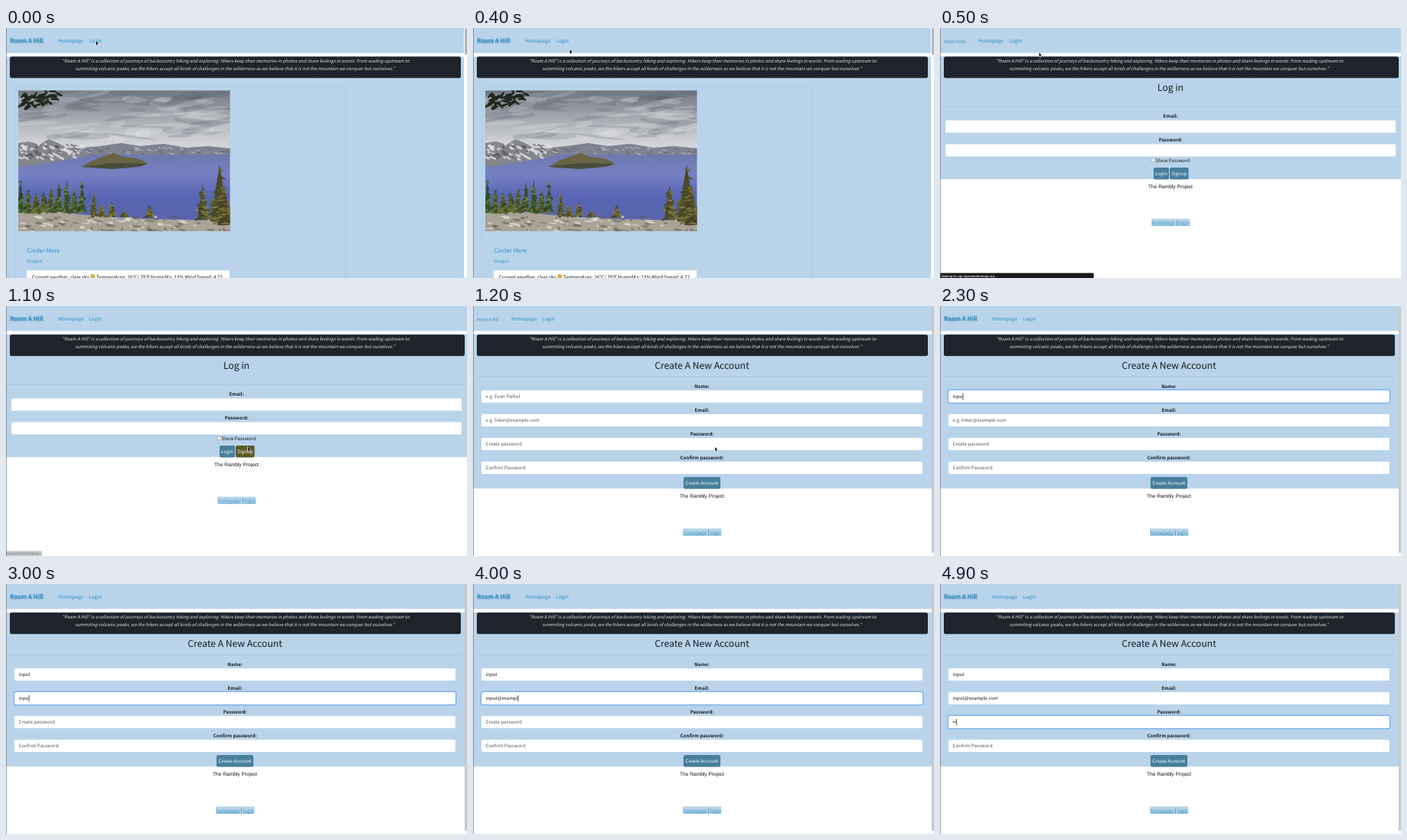
These frames come from a looping animation (600x326 px, 5 s). An HTML page with a canvas:

```html
<!DOCTYPE html>
<html lang="en">
<head>
<meta charset="utf-8">
<title>Hiking site sign-up</title>
<style>
html, body { margin: 0; width: 100%; height: 100%; overflow: hidden; background: #fff; }
canvas { display: block; }
</style>
</head>
<body>
<canvas id="stage" width="600" height="326"></canvas>
<script>
const ctx = document.getElementById('stage').getContext('2d');
const SANS = '"Noto Sans CJK SC", "Noto Sans CJK JP", "Noto Sans CJK", sans-serif';
const UI = 'Inter, sans-serif';
const ARIAL = '"Liberation Sans", sans-serif';
const BLUE = '#b9d4ea', INK = '#14191d', LINK = '#1f8cca', GREY = '#4f575e';
const LOOP = 5000, STEP = 100;
// steps at which pages, focus and mouse states change
const LOGIN_AT = 5, HOVER_AT = 9, SIGNUP_AT = 12, FOCUS_AT = [14, 25, 46];
// step at which each character appears
const NAME_KEYS = [20, 21, 22, 23, 24];
const EMAIL_KEYS = [27, 28, 29, 30, 31, 32, 35, 36, 37, 37, 40, 40, 41, 42, 43, 44, 45];
const PASSWORD_KEYS = [48, 49];
const MOUSE = [[0, 117, 17], [2, 117, 17], [5, 129, 32], [9, 315, 184], [12, 315, 184], [14, 259, 119], [20, 259, 119]];

function rect(x, y, w, h, color, radius = 0) {
  ctx.fillStyle = color;
  ctx.beginPath();
  ctx.roundRect(x, y, w, h, radius);
  ctx.fill();
}

function text(str, x, y, { size = 6.1, color = INK, align = 'left', style = '', family = SANS } = {}) {
  ctx.font = `${style} ${size}px ${family}`;
  ctx.fillStyle = color;
  ctx.textAlign = align;
  ctx.fillText(str, x, y);
  return ctx.measureText(str).width;
}

function poly(color, ...points) {
  ctx.fillStyle = color;
  ctx.beginPath();
  for (let i = 0; i < points.length; i += 2) ctx.lineTo(points[i], points[i + 1]);
  ctx.fill();
}

function ellipse(x, y, rx, ry, color, angle = 0) {
  ctx.fillStyle = color;
  ctx.beginPath();
  ctx.ellipse(x, y, rx, ry, angle, 0, 7);
  ctx.fill();
}

function gradient(y0, y1, ...colors) {
  const g = ctx.createLinearGradient(0, y0, 0, y1);
  colors.forEach((c, i) => g.addColorStop(i / (colors.length - 1), c));
  return g;
}

function seeded(seed) {
  return () => (seed = seed * 16807 % 2147483647) / 2147483647;
}

function tree(rnd, x, top, bottom, half, hue) {
  poly(`hsl(${hue} 30% 22%)`, x, top, x + half * .7, bottom, x - half * .7, bottom);
  for (let i = 0; i < 40; i++) {
    const k = Math.sqrt(rnd()), side = rnd() * 2 - 1;
    ellipse(x + side * half * k, top + (bottom - top) * k, 1 + half * .2, 1.2,
      `hsl(${hue} 34% ${18 + rnd() * 22}%)`, side * .6);
  }
}

function photo() {
  const rnd = seeded(41);
  ctx.save();
  ctx.beginPath();
  ctx.rect(16, 81.5, 275.5, 183.5);
  ctx.clip();
  rect(16, 81, 276, 90, gradient(81, 160, '#70767f', '#969ba3', '#bcbfc4', '#dcddde'));
  for (let i = 0; i < 70; i++) {
    const tone = rnd() < .55 ? '240,240,240' : '82,90,104';
    ellipse(16 + rnd() * 276, 84 + rnd() * 58, 10 + rnd() * 30, 1.5 + rnd() * 4, `rgba(${tone},.2)`, -.3 + rnd() * .45);
  }
  poly('#7f8290', 16, 158, 100, 156, 122, 154, 150, 150, 175, 154, 205, 151, 235, 156, 262, 154, 292, 157, 292, 167, 16, 176);
  rect(16, 165, 276, 90, gradient(165, 245, '#6f79ae', '#7580c2', '#5865b4', '#5865ae'));
  poly('#85868c', 16, 150, 30, 148, 44, 152, 55, 145, 68, 150, 80, 157, 98, 158, 118, 164, 84, 171, 50, 177, 16, 181);
  for (let i = 0; i < 75; i++) {
    const x = 16 + rnd() * 84, y = 151 + rnd() * 20;
    ellipse(x, y, 1 + rnd() * 4, .8 + rnd(), rnd() < .6 ? 'rgba(232,233,238,.75)' : 'rgba(70,70,76,.6)', .5);
  }
  for (let i = 0; i < 50; i++) {
    ellipse(105 + rnd() * 187, 156 + rnd() * 8, 1 + rnd() * 4, .7, rnd() < .4 ? 'rgba(220,222,230,.5)' : 'rgba(82,82,92,.5)', .3);
  }
  poly('#696444', 98, 181, 112, 173, 128, 167, 140, 163, 153, 168, 171, 170, 185, 176, 178, 180, 140, 183);
  poly('#484c3c', 98, 181, 140, 176, 185, 177, 172, 181, 138, 184);
  poly('#aaa397', 16, 233, 55, 238, 95, 243, 140, 247, 190, 249, 235, 250, 292, 252, 292, 266, 16, 266);
  for (let i = 0; i < 110; i++) {
    ellipse(16 + rnd() * 276, 246 + rnd() * 19, 1 + rnd() * 6, .5 + rnd() * 1.4,
      rnd() < .5 ? 'rgba(228,224,220,.7)' : 'rgba(88,84,68,.5)', .12);
  }
  for (let i = 0; i < 9; i++) tree(rnd, 19 + i * 10, 196 + rnd() * 18, 238 + rnd() * 5, 6, 75 + rnd() * 25);
  for (const [x, y] of [[114, 215], [125, 230], [138, 226], [154, 240], [187, 233]]) tree(rnd, x, y, 246, 5, 56);
  tree(rnd, 256, 204, 250, 10, 56);
  tree(rnd, 278, 178, 252, 17, 60);
  tree(rnd, 284, 205, 257, 13, 50);
  for (let i = 0; i < 42; i++) {
    const x = 15 + rnd() * 58;
    ellipse(x, 81 + rnd() * (28 - (x - 16) * .27), 5, 1.5, '#20281f', rnd() * 2 - 1);
  }
  ctx.restore();
}

function header(right, loading) {
  rect(0, 0, right, 32.5, BLUE);
  ctx.save();
  Object.assign(ctx, { shadowColor: 'rgba(20,80,130,.45)', shadowBlur: 1.5, shadowOffsetX: .6, shadowOffsetY: .6 });
  text('Roam A Hill', 5, 19, loading ? { size: 5.2, color: '#58a9d6' } : { size: 7.7, color: '#2f93c8', style: 'bold' });
  ctx.restore();
  const x = loading ? 50 : 68;
  text('Homepage', x, 18.7, { size: 6.45, color: LINK });
  text('Login', x + 40, 18.7, { size: 6.45, color: LINK });
}

function banner(right) {
  rect(5, 37.3, right - 5, 28, '#1e242a', 2.5);
  const style = { size: 5.77, color: '#e2e4e6', align: 'center', style: 'italic' };
  text('"Roam A Hill" is a collection of journeys of backcountry hiking and exploring. Hikers keep their memories in photos and share feelings in words. From wading upstream to', 299, 45, style);
  text('summiting volcanic peaks, we the hikers accept all kinds of challenges in the wilderness as we believe that it is not the mountain we conquer but ourselves."', 298, 55, style);
}

function footer(center, y, linksY) {
  text('The Rambly Project', center, y, { size: 6.6, family: ARIAL, align: 'center', color: '#111' });
  rect(center - 24.7, linksY - 7.3, 50, 9.6, '#b3d3ea');
  let x = center - 24.2;
  for (const word of ['homepage', ' | ', 'login']) {
    const isLink = word !== ' | ';
    const w = text(word, x, linksY, { color: isLink ? '#3a98c6' : INK });
    if (isLink) rect(x, linksY + .8, w, .6, '#3a98c6');
    x += w;
  }
}

function title(str, center) {
  text(str, center, 82, { size: 12.1, style: '500', align: 'center' });
}

function button(label, x, y, w, color = '#477f9d') {
  rect(x, y, w, 15.5, color, 2);
  text(label, x + w / 2, y + 10, { color: '#fff', align: 'center' });
}

function field(label, center, x, y, w, { value = '', hint = '', focus = false, family } = {}) {
  text(label, center, y - 3.2, { size: 6.05, style: 'bold', align: 'center' });
  if (focus) {
    rect(x - 1.5, y - 1.5, w + 3, 19, '#8bb9ee', 3);
    rect(x - .5, y - .5, w + 1, 17, '#6aa5e8', 2);
  }
  rect(x, y, w, 16, '#fff', 2);
  const style = value ? { color: INK, family } : { color: GREY };
  const textWidth = text(value || hint, x + 5.5, y + 10.3, style);
  if (focus) rect(x + 5.8 + (value ? textWidth : 0), y + 4, .7, 8.5, '#111');
}

function homePage() {
  rect(0, 0, 596, 326, BLUE);
  rect(0, 32.5, 596, 5, '#fff');
  header(596);
  banner(592);
  ctx.strokeStyle = '#abc6dc';
  ctx.lineWidth = .7;
  ctx.strokeRect(12, 77, 430, 260);
  photo();
  text('Cinder Mere', 27, 293, { size: 7.7, color: '#2598cf' });
  text('Oregon', 27, 306, { size: 5.9, color: '#2598cf', style: '500' });
  rect(27, 316, 264, 10, '#fff');
  text('Current weather: clear sky', 34, 327, { color: '#111' });
  ellipse(113, 324, 3, 3, '#d9ae4b');
  text('Temperature: 26°C/ 79°F Humidity: 13% Wind Speed: 4.72', 117.5, 327, { size: 6.2, color: '#111' });
  rect(597, 0, 3, 35, '#b5b5b5', 1.5);
}

function loginPage(step) {
  const loading = step === LOGIN_AT, hover = step >= HOVER_AT;
  rect(0, 37, 600, 160, BLUE);
  header(600, loading);
  banner(597);
  title('Log in', 300);
  rect(0, 102.5, 600, .7, '#a6c0d4');
  field('Email:', 300, 7, 120.5, 586);
  field('Password:', 300, 7, 151.5, 586);
  rect(275, 170, 5, 5, '#777', 1);
  rect(275.5, 170.5, 4, 4, '#fff', .5);
  text('Show Password', 280.5, 175.2);
  button('Login', 278, 182, 20);
  button('Signup', 299, 182, 24.5, hover ? '#5d5b24' : undefined);
  footer(300, 208.5, 256);
  if (loading) {
    rect(0, 319.5, 200, 6.5, '#19191b', 1);
    text('Waiting for api.openweathermap.org...', 2, 324.5, { size: 3.9, color: '#e4e4e4', style: '600', family: UI });
  } else if (hover) {
    rect(0, 319.5, 47, 6.5, '#c3c6c9', 1);
    text('localhost:3000/signup', 1.5, 324.3, { size: 3.9, color: '#6d7175', family: UI });
  }
}

function signupPage(step) {
  const typed = (str, keys) => str.slice(0, keys.filter(k => k <= step).length);
  const active = FOCUS_AT.filter(s => s <= step).length - 1;
  const fields = [
    ['Name:', 'e.g. Evan Pathel', typed('input', NAME_KEYS)],
    ['Email:', 'e.g. hiker@example.com', typed('input@example.com', EMAIL_KEYS)],
    ['Password:', 'Create password', typed('••', PASSWORD_KEYS), ARIAL],
    ['Confirm password:', 'Confirm Password', '']
  ];
  rect(0, 37, 597, 201, BLUE);
  header(597, step === SIGNUP_AT);
  banner(592);
  title('Create A New Account', 298);
  rect(5, 92, 587, .7, '#a6c0d4');
  fields.forEach(([label, hint, value, family], i) =>
    field(label, 298, 11, 110 + i * 31, 574, { hint, value, family, focus: i === active }));
  button('Create Account', 274, 223, 48);
  footer(298, 249.5, 297.5);
  rect(597, 0, 3, 322, '#c6c8ca', 1.5);
  if (step > FOCUS_AT[0] && step < NAME_KEYS[0]) {
    rect(11, 126.5, 66, 80, '#1b1c1e', 2);
    ['Tomas Orvel', 'Evan Rudo', 'Tomas', 'tomas', 'Bartholomew', 'evan'].forEach((name, i) =>
      text(name, 15, 137.5 + i * 12.4, { size: 4.4, color: '#f2f2f2', style: '600', family: UI }));
  }
}

function pointer(step) {
  const i = MOUSE.findIndex(p => p[0] > step);
  if (i < 0) return;
  const [s0, x0, y0] = MOUSE[i - 1], [s1, x1, y1] = MOUSE[i];
  const u = (step - s0) / (s1 - s0), k = u * u * (3 - 2 * u);
  const x = x0 + (x1 - x0) * k, y = y0 + (y1 - y0) * k;
  if (step >= FOCUS_AT[0]) {
    rect(x - .4, y - 3, .8, 6, '#222');
    rect(x - 1.3, y - 3.2, 2.6, .6, '#222');
    rect(x - 1.3, y + 2.6, 2.6, .6, '#222');
  } else {
    poly('#fff', x - .7, y - 1, x + 4.2, y + 3.9, x + 2, y + 4.2, x + 2.7, y + 6, x + 1.2, y + 6.4, x + .5, y + 4.8, x - .7, y + 6);
    poly('#111', x, y, x + 3.4, y + 3.5, x + 1.6, y + 3.7, x + 2.3, y + 5.5, x + 1.4, y + 5.8, x + .8, y + 4.1, x, y + 4.8);
  }
}

function draw(now) {
  const step = Math.floor(now % LOOP / STEP);
  ctx.textRendering = 'geometricPrecision';
  rect(0, 0, 600, 326, '#fff');
  if (step < LOGIN_AT) homePage();
  else if (step < SIGNUP_AT) loginPage(step);
  else signupPage(step);
  rect(0, 0, .6, 326, '#59646d');
  pointer(step);
}

let start;
function tick(now) {
  start ??= now;
  draw(now - start);
  requestAnimationFrame(tick);
}
requestAnimationFrame(tick);
</script>
</body>
</html>
```
